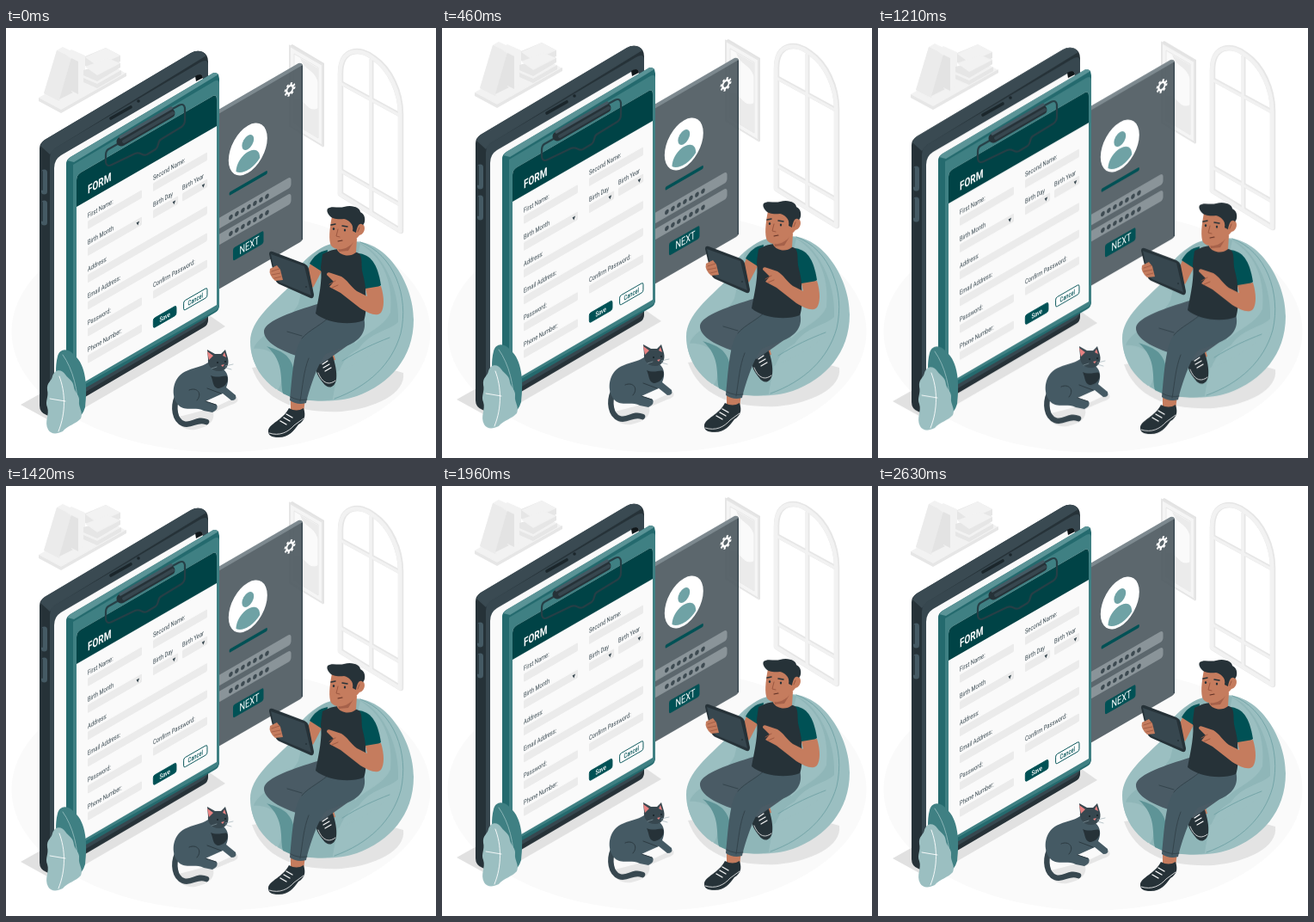
Recreate the animation shown at these times as an HTML page. Size 500 px wide and 500 px high, loop 2680 ms.

```html
<!DOCTYPE html>
<html lang="en">
<head>
<meta charset="utf-8">
<title>Form</title>
<style>
html, body { margin: 0; width: 100%; height: 100%; overflow: hidden; background: #fff; }
svg { display: block; width: 100%; height: 100%; }
text { font-family: Roboto, "Open Sans", sans-serif; }
/* linear bobbing, 1.5 s per cycle at 24 pictures a second, cut off at 2.68 s */
#float { animation: bob 2680ms -3.4ms infinite; }
@keyframes bob {
  0%       { transform: translateY(0);     animation-timing-function: steps(18); }
  27.985%  { transform: translateY(-10px); animation-timing-function: steps(18); }
  55.970%  { transform: translateY(0);     animation-timing-function: steps(18); }
  83.955%  { transform: translateY(-10px); animation-timing-function: steps(9); }
  97.948%, 100% { transform: translateY(-5px); }
}
.ln { fill: none; stroke-linecap: round; stroke-linejoin: round; }
.ink { fill: #263238; }
.slate { fill: #37474f; }
.deep { fill: #005155; }
.mist { fill: #9bbfc1; }
.skin { fill: #c57c5e; }
</style>
</head>
<body>
<svg viewBox="0 -1 500 500">
<defs>
  <path id="arch" d="M389 192V52C389 22 412 21 428 34C447 47 459 74 459 99V235Z"/>
  <path id="bars" d="M425 36V212M390 63L458 100M390 165L458 204"/>
</defs>
<ellipse cx="250" cy="352" rx="243.5" ry="140.5" fill="#fafafa"/>
<g id="float">

  <g id="shelf">
    <path d="M38 80L113 37L140 52L64 95Z" fill="#f2f2f2"/>
    <path d="M38 80L64 94L140 51V55L64 98L38 84Z" fill="#e6e6e6"/>
    <path d="M44 75L59 25L66 21L83 29L66 85L60 84Z" fill="#f2f2f2"/>
    <path d="M44 75L59 25L76 33L62 84Z" fill="#ebebeb"/>
    <path d="M62 82L76 33L80 31L80 73Z" fill="#e3e3e3"/>
    <path d="M68 29L76 24L92 31V70L82 76L76 73V35Z" fill="#f2f2f2"/>
    <path d="M76 34L84 38V76L76 72Z" fill="#e3e3e3"/>
    <path d="M92 32L116 22L133 31V38L106 50L92 43Z" fill="#e6e6e6"/>
    <path d="M92 33L116 22L133 31L106 43Z" fill="#f2f2f2"/>
    <path d="M90 48L128 37L133 40V45L106 61L90 54Z" fill="#e6e6e6"/>
    <path d="M92 44L118 34L133 40L106 54Z" fill="#f2f2f2"/>
    <path d="M90 57L106 64L134 48V53L106 69L90 62Z" fill="#e6e6e6"/>
  </g>

  <g id="picture">
    <path d="M329 20L333 18L370 40V137L366 135Z" fill="#e3e3e3"/>
    <path d="M330 20L368 42V136L330 113Z" fill="#f5f5f5" stroke="#e6e6e6" stroke-width="2"/>
    <path d="M335 29L363 45V127L335 110Z" fill="#fafafa" stroke="#e8e8e8"/>
    <path d="M342 34C348 50 357 45 363 62V46ZM335 83C345 75 350 100 363 92V127L335 110Z" fill="#ebebeb"/>
  </g>

  <g id="window" class="ln">
    <g stroke="#e6e6e6" stroke-width="6.5">
      <use href="#arch"/><use href="#bars" stroke-width="5"/>
    </g>
    <g stroke="#f2f2f2" transform="translate(-.8 .4)" stroke-width="4.6">
      <use href="#arch"/><use href="#bars" stroke-width="3.2"/>
    </g>
  </g>

  <path d="M17 437L42 423L235 332L255 346L70 453L48 454Z" fill="#e1e1e1"/>

  <g id="panel">
    <path d="M240 99L340 41Q342 39 345 42V244Q345 246 342 248L240 307Z" fill="#4c585f" opacity=".91"/>
    <path d="M240 98L340 40Q344 39 345 42L240 103Z" fill="#7d898f"/>
    <path d="M344.3 43V245" stroke="#37474f" stroke-width="1.4"/>
    <g transform="matrix(.866 -.5 0 1 330 70.5)" fill="none" stroke="#fff">
      <circle r="4.3" stroke-width="2.4"/>
      <circle r="6.2" stroke-width="2.6" stroke-dasharray="2.435"/>
    </g>
    <g transform="matrix(.866 -.5 0 1 281.3 139)">
      <ellipse cy="1" rx="26" ry="27.5" fill="#fff"/>
      <circle cy="-7" r="8" fill="#6fa2a5"/>
      <path d="M-16 19C-15 -1 16 -1 16 19C8 27 -8 27 -16 19Z" fill="#6fa2a5"/>
      <rect x="-25" y="38.5" width="51" height="4" rx="1.5" class="deep"/>
      <rect x="-50" y="61.5" width="108" height="12.5" rx="4" fill="#8a9499"/>
      <rect x="-50" y="80.5" width="108" height="12.5" rx="4" fill="#8a9499"/>
      <path class="ln" d="M-23 68.5H26M-23 87.5H26" stroke="#3d4a51" stroke-width="5.4" stroke-dasharray="0 8.1"/>
      <rect x="-20" y="106" width="41" height="15" rx="2.5" class="deep"/>
    </g>
    <text transform="matrix(.72 -.415 0 1 271.5 262.5)" font-size="12.8" fill="#fff">NEXT</text>
  </g>

  <g id="device">
    <path class="ink" d="M39 139Q39 133 45 129L215 28Q222 24 229 27Q235 30 235 38V339Q235 344 230 347L58 448Q52 452 47 449Q39 446 39 438Z"/>
    <path fill="#3a4a52" d="M40 136Q41 132 45 129L215 28Q222 24 229 27L233 31L57 139L51 146Z"/>
    <path class="slate" d="M51 150Q51 142 58 138L224 40Q235 33 235 42V331Q235 338 229 342L62 440Q51 446 51 437Z"/>
    <path d="M56 162Q56 152 64 147L220 56Q229 50 229 59V318L56 418Z" fill="#fafafa"/>
    <path d="M220 55Q228 50 229 57L221 61Z" fill="#101619"/>
    <path class="ln" d="M122 104L145 91" stroke="#1b262b" stroke-width="3.6"/>
    <circle cx="154" cy="84" r="1.8" fill="#1b262b"/>
    <path class="ln" d="M44.5 167V189M44.5 203V225" stroke="#455a64" stroke-width="7"/>
    <path class="ln" d="M42 166V187M42 202V223" stroke="#2c3a41" stroke-width="2"/>
  </g>

  <g id="board">
    <path d="M70 157Q70 152 75 149L238 53Q243 49 247 53L248 58V322Q248 327 243 330L83 423L70 416Z" fill="#246a6e"/>
    <path d="M71 153L75 149L238 53Q243 49 247 53L79 155Z" fill="#5b9497"/>
    <path d="M78 158L242 61Q248 58 248 64V320Q248 325 243 328L78 421Z" fill="#3f8083"/>
    <path d="M82 176Q82 170 87 167L239 79Q245 75 245 82V321L82 416Z" fill="#fafafa"/>
    <path d="M82 176Q82 170 87 167L239 79Q245 75 245 82V113L82 207Z" fill="#004346"/>
    <path class="ln" d="M133 132L119 140Q116 142 116 147V155Q117 161 123 158L150 145C157 142 158 149 164 146L174 140C179 136 175 131 181 128L204 114Q208 111 208 106V92Q207 86 201 89L190 95" stroke="#263f46" stroke-width="2.2"/>
    <path class="ln" d="M134 131L191 98" stroke="#263238" stroke-width="11"/>
    <path class="ln" d="M133 126L192 92" stroke="#455a64" stroke-width="3.5"/>
    <path class="ln" d="M137 131L194 98" stroke="#37474f" stroke-width="4"/>
    <text transform="matrix(.72 -.415 0 1 95 192)" font-size="13.8" font-weight="700" fill="#fff">FORM</text>
    <g id="form" transform="matrix(.72 -.415 0 1 95 220)" font-size="8" fill="#37474f"></g>
  </g>

  <g id="plant">
    <path d="M83 452C62 440 54 403 60 381C62 372 72 370 80 380C93 391 95 416 92 440Q89 450 83 452Z" fill="#3f8083"/>
    <path class="ln" d="M66 379C78 396 84 420 84 448" stroke="#8ab5b7"/>
    <path class="mist" d="M49 466C44 456 51 449 48 440C45 433 50 428 48 420C47 411 53 410 54 404C57 395 65 396 69 402C73 408 78 408 79 417C80 423 86 426 85 433C84 440 90 445 87 453C82 459 72 461 66 468C58 472 52 471 49 466Z"/>
    <path class="ln" d="M62 404C69 422 70 446 61 468M51 430L69 433" stroke="#fff" stroke-width=".9"/>
  </g>

  <g id="cat">
    <path d="M196 452Q215 448 245 439L268 428Q273 434 262 437L241 446Q244 461 220 466Q204 468 196 452Z" fill="#e6e6e6"/>
    <path class="ln" d="M199 428C194 440 196 455 206 459C216 463 222 452 233 457" stroke="#37474f" stroke-width="6.5"/>
    <path fill="#455a64" d="M236 387C229 394 211 394 202 403C193 412 192 429 201 438C208 445 221 439 230 444L240 446Q248 442 245 437L232 433L252 424L262 432Q269 432 267 426L256 417C260 408 258 401 254 397L246 390Z"/>
    <path class="ink" d="M238 403C246 407 255 402 257 404C260 411 253 418 246 418C240 416 241 409 238 403Z"/>
    <path class="ln" d="M213 420C222 416 229 424 222 432M232 433L244 437M234 418L250 424" stroke="#2c3a41" stroke-width="1"/>
    <path class="slate" d="M234 373L243 378L250 378L255 373L258 383C260 391 256 398 248 398C238 398 234 390 235 384Z"/>
    <path d="M234 375L241 380L236 385Z" fill="#e98383"/>
    <path d="M254 376L256 382L252 380Z" fill="#e98383"/>
    <circle cx="246" cy="388" r="1" fill="#172126"/><circle cx="255" cy="387" r="1" fill="#172126"/>
    <path d="M250 391L254 390L252 393Z" fill="#e98383"/>
    <path class="ln" d="M255 392L264 390M255 394L262 396M245 393L239 395" stroke="#90a4ae" stroke-width=".6"/>
  </g>

  <path d="M286 394C300 434 340 447 390 445C430 441 465 424 462 400L390 380Z" fill="#e3e3e3"/>

  <g id="bag">
    <path class="mist" d="M284 364C284 338 312 318 329 300C340 268 366 247 404 247C444 247 474 297 474 338C474 383 446 413 408 427C379 437 336 433 316 420C298 407 284 388 284 364Z"/>
    <path d="M352 268C366 248 390 246 408 248C436 256 458 300 456 341C444 352 424 352 410 372C394 381 386 391 380 431C358 435 334 431 316 420C328 404 312 378 288 372C292 356 326 345 340 320Z" fill="#8fb6b8"/>
    <path class="mist" d="M412 250C442 268 450 300 447 330C438 348 420 352 406 366L392 330Z"/>
    <path class="mist" d="M285 372C301 370 318 378 319 390C321 404 318 414 314 419C298 408 287 392 285 372ZM386 398C401 392 436 378 457 349C452 389 428 417 380 431Z"/>
    <path d="M303 369C324 376 341 380 335 430L322 424C318 409 325 388 303 369Z" fill="#5e9497"/>
    <path class="ln" d="M412 248C451 262 469 311 459 354C449 390 421 416 382 430M391 386C412 373 428 366 446 359" stroke="#74a5a8"/>
  </g>

  <g id="man">
    <path class="skin" d="M366 371L378 367L383 385L370 387Z"/>
    <path class="ink" d="M361 391C361 386 368 388 370 376L379 378C383 389 385 399 384 408C382 418 374 419 369 412C363 404 359 399 361 391Z"/>
    <path class="ln" d="M363 400C367 410 374 416 383 409" stroke="#fff" stroke-width=".8"/>
    <path class="ln" d="M368 390L374 386M369 394L376 390M371 398L378 394" stroke="#fff" stroke-width="1.2"/>
    <path fill="#4a5b65" d="M362 320C336 328 302 339 300 351C299 364 320 375 344 382L366 390L382 379L406 362L402 336Z"/>
    <path class="skin" d="M331 430H348L346 446L331 447Z"/>
    <path class="ink" d="M305 467C306 459 322 455 329 441Q338 446 346 441C349 450 347 456 340 460C334 468 329 475 317 475Q304 475 305 467Z"/>
    <path class="ln" d="M306 470C318 474 328 469 335 461L346 453" stroke="#fff" stroke-width=".8"/>
    <path class="ln" d="M319 456L326 460M323 452L330 456M326 448L333 452" stroke="#fff" stroke-width="1.4"/>
    <path fill="#455a64" d="M362 322L416 336C420 350 413 361 400 367L372 378C364 386 353 417 349 435Q339 438 330 432C333 403 334 374 344 360C352 350 368 344 378 333Z"/>
    <path class="ln" d="M344 360C352 350 368 344 378 333M352 383C346 398 345 415 342 433M331 428Q340 433 350 431M327 352L344 357" stroke="#34444c" stroke-width="1"/>

    <path class="skin" d="M354 273L368 280L357 301L347 290Z"/>
    <path class="deep" d="M353 273C358 264 364 259 374 257L370 284Z"/>
    <path class="deep" d="M409 261C424 262 432 273 436 298Q428 305 413 303Z"/>
    <path class="ink" d="M368 262Q380 255 390 256L408 260C415 262 413 272 414 281C416 290 418 296 418 304C419 319 419 333 416 339C398 346 371 341 360 331C364 310 368 293 366 277Z"/>
    <path class="skin" d="M386 246L408 244L407 260C400 266 389 264 385 257Z"/>
    <path d="M386 253Q396 257 404 248L398 258L387 259Z" fill="#a5614a"/>
    <path class="skin" d="M379 218C376 233 375 246 378 252C384 259 396 257 403 249L411 240C419 238 419 225 411 226L408 216Z"/>
    <path class="ink" d="M374 209C379 205 386 209 393 207C404 204 412 209 412 213C419 216 418 226 415 228C411 224 408 230 407 237L403 235C405 227 398 222 393 221C386 222 379 221 376 217Q372 212 374 209Z"/>
    <path class="ln" d="M378 228L383 227M391 229L397 230" stroke="#263238" stroke-width="1.5"/>
    <ellipse cx="381" cy="232.5" rx="1.2" ry="1.6" class="ink"/><ellipse cx="394" cy="234" rx="1.2" ry="1.6" class="ink"/>
    <path class="ln" d="M386 233L384 241L388 242M411 231L409 236" stroke="#9b5740" stroke-width="1"/>
    <path class="ln" d="M386 247L391 246" stroke="#5d2f24" stroke-width="1.1"/>

    <path class="ink" d="M306 262Q306 258 310 259L347 273Q351 275 352 279L358 309Q358 314 354 313L318 297Q314 295 313 291Z"/>
    <path class="slate" d="M308 262L347 276L355 310L319 295L314 290Z"/>
    <circle cx="349" cy="300" r="1" class="ink"/>
    <path class="skin" d="M307 279L315 275L319 280L321 288L322 292L313 293Q305 286 307 279Z"/>
    <path class="ln" d="M309 282L318 279M309 286L319 284M312 290L320 288" stroke="#9b5740" stroke-width=".8"/>
    <path class="skin" d="M418 302L436 299C440 312 440 324 436 330C431 335 422 331 412 325L389 307L376 300L381 294L373 286Q373 282 378 284L390 288C397 292 401 300 408 305L420 311Z"/>
    <path class="ln" d="M376 297L383 293M379 301L386 298" stroke="#9b5740" stroke-width=".9"/>
  </g>
</g>
</svg>
<script>
const form = document.getElementById("form"), row = 31.2;
// label, row, left, width, has a dropdown arrow
const fields = [
  ["First Name:", 0, 0, 87.5], ["Second Name:", 0, 105.5, 87.5],
  ["Birth Month", 1, 0, 87.5, 1], ["Birth Day", 1, 105.5, 40.5, 1], ["Birth Year", 1, 152.8, 40.5, 1],
  ["Address:", 2, 0, 193], ["Email Address:", 3, 0, 193],
  ["Password:", 4, 0, 87.5], ["Confirm Password:", 4, 105.5, 87.5],
  ["Phone Number:", 5, 0, 87.5]
];
const button = (label, x, y, w, fill, ink) =>
  `<rect x="${x}" y="${y}" width="${w}" height="11" rx="2.5" fill="${fill}" stroke="#005155"/>
   <text x="${x + w / 2}" y="${y + 8.4}" text-anchor="middle" font-weight="500" fill="${ink}">${label}</text>`;

form.innerHTML = fields.map(([label, r, x, w, drop]) => {
  const y = r * row, a = x + w - 9;
  return `<text x="${x}" y="${y}">${label}</text>
    <rect x="${x}" y="${y + 3.5}" width="${w}" height="9.5" rx="1.5" fill="#ebebeb"/>` +
    (drop ? `<path d="M${a} ${y + 7}h5l-2.5 4Z"/>` : "");
}).join("") +
  button("Save", 106, 161, 37, "#005155", "#fff") +
  button("Cancel", 155, 161, 38, "#fff", "#005155");
</script>
</body>
</html>
```
